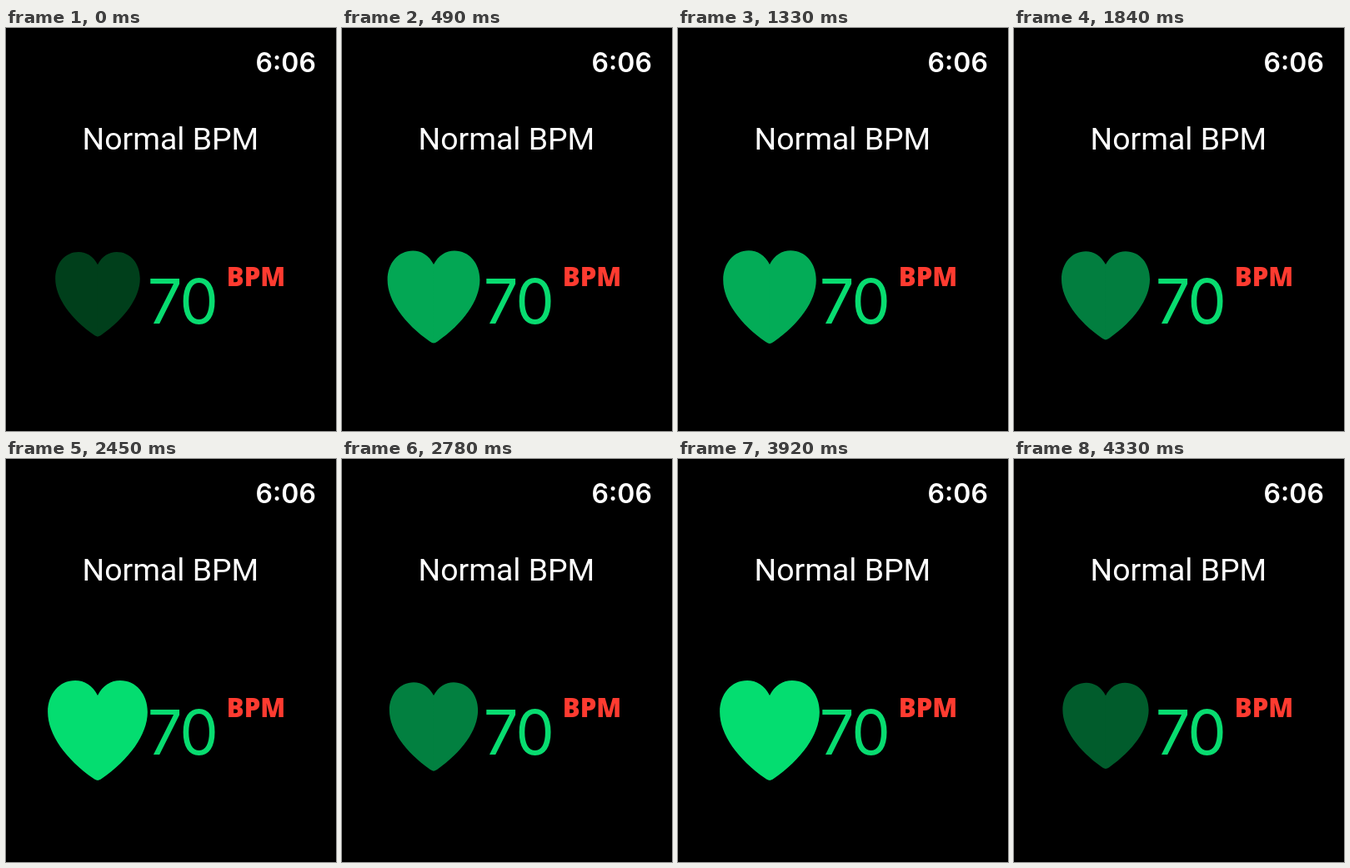
Recreate the animation shown at these times as an HTML page with a canvas. Size 396 px wide and 484 px high, loop 4.42 s.

```html
<!DOCTYPE html>
<html lang="en">
<head>
<meta charset="utf-8">
<title>Heart rate</title>
<style>
  html, body { margin: 0; width: 100%; height: 100%; overflow: hidden; background: #000; }
  canvas { display: block; width: 100%; height: 100%; }
</style>
</head>
<body>
<canvas id="stage" width="396" height="484"></canvas>
<script>
const ctx = document.getElementById('stage').getContext('2d');

const LOOP = 4420;
const EASE = 550;
const GAMMA = 2.2;
const REST = { scale: 0.847, color: [0, 63, 27] };
const FULL = { scale: 1, color: [4, 222, 113] };
const PIVOT = { x: 110, y: 285 };

// Times at which the picture refreshes; beats alternately swell and relax.
const BEATS = [
  [270, 380, 490, 590, 700],
  [1000, 1110, 1220, 1340, 1450],
  [1720, 1840, 1960, 2070, 2180],
  [2450, 2570, 2670, 2780, 2880],
  [3190, 3310, 3410, 3520, 3630],
  [3920, 4020, 4120, 4230, 4330]
];

const mix = (a, b, p) => a + (b - a) * p;

// Blends one colour channel in linear light.
const mixLight = (a, b, p) =>
  Math.round(Math.pow(mix(Math.pow(a, GAMMA), Math.pow(b, GAMMA), p), 1 / GAMMA));

function smooth(x) {
  const t = Math.min(1, Math.max(0, x));
  return t * t * (3 - 2 * t);
}

// Swell of the heart: 0 at rest, 1 at full size.
function swellAt(time) {
  let swell = 0;
  BEATS.forEach((ticks, i) => {
    const tick = ticks.filter(t => t <= time).pop();
    if (tick === undefined) return;
    const rising = i % 2 === 0;
    const lead = rising ? 55 : 40;
    const p = smooth((tick - ticks[0] + lead) / EASE);
    swell = rising ? p : 1 - p;
  });
  return swell;
}

function halfHeart(side) {
  const curve = (x1, y1, x2, y2, x, y) =>
    ctx.bezierCurveTo(side * x1, y1, side * x2, y2, side * x, y);
  ctx.beginPath();
  ctx.moveTo(-side * 0.5, 0);
  ctx.lineTo(0, -1);
  curve(6, -13, 16, -19, 27, -19);
  curve(46, -19, 60, -3, 60, 19);
  curve(60, 46, 38, 76, 5, 99);
  curve(3, 100.4, 1.5, 101, 0, 101);
  ctx.lineTo(-side * 0.5, 101);
  ctx.fill();
}

function drawHeart(swell) {
  const scale = mix(REST.scale, FULL.scale, swell);
  const color = REST.color.map((c, i) => mixLight(c, FULL.color[i], swell));
  ctx.save();
  ctx.translate(PIVOT.x, PIVOT.y);
  ctx.scale(scale, scale);
  ctx.fillStyle = `rgb(${color.join(',')})`;
  halfHeart(-1);
  halfHeart(1);
  ctx.restore();
}

// Centres the visible ink of the text on x.
function label(text, x, baseline, font, color, spacing = 0) {
  ctx.font = font;
  ctx.letterSpacing = spacing + 'px';
  ctx.fillStyle = color;
  const box = ctx.measureText(text);
  const shift = (box.actualBoundingBoxRight - box.actualBoundingBoxLeft) / 2;
  ctx.fillText(text, x - shift, baseline);
}

function draw(time) {
  ctx.fillStyle = '#000';
  ctx.fillRect(0, 0, 396, 484);
  drawHeart(swellAt(time));
  label('6:06', 335.5, 52.5, '600 32px Inter, sans-serif', '#fff');
  label('Normal BPM', 197.5, 146, '400 37.4px Roboto, sans-serif', '#fff');
  label('70', 212, 354.5, '400 74px Inter, sans-serif', '#08dc70', -2);
  label('BPM', 300, 310, '800 31px "Open Sans", sans-serif', '#ff3b30');
}

const start = performance.now();

function frame() {
  draw((performance.now() - start) % LOOP);
  requestAnimationFrame(frame);
}
frame();
</script>
</body>
</html>
```
